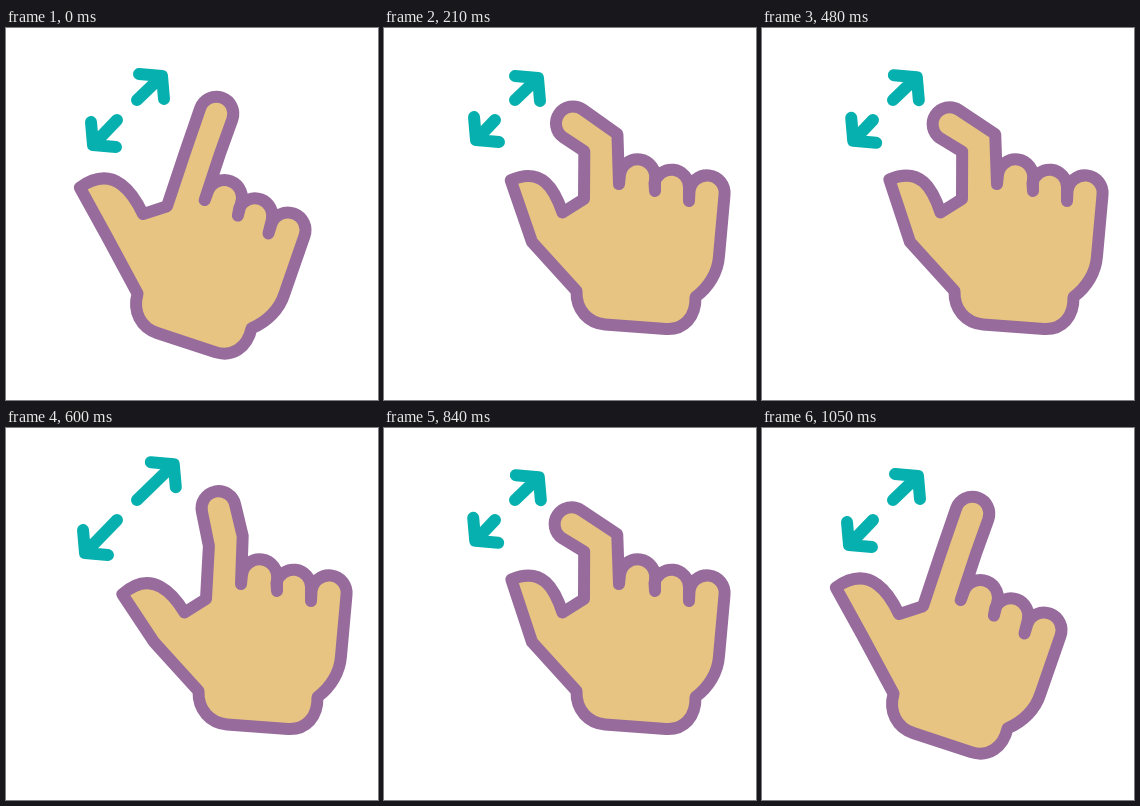
Animation, 372 px wide and 372 px high, one loop 1110 ms. Source, as an HTML page:

```html
<!DOCTYPE html>
<html lang="en">
<head>
<meta charset="utf-8">
<title>Pinch gesture</title>
<style>
  html, body { margin: 0; width: 100%; height: 100%; overflow: hidden; background: #fff; }
  svg { display: block; width: 100%; height: 100%; }
  path { stroke-width: 12; stroke-linecap: round; stroke-linejoin: round; }
  #hand { fill: #e7c481; stroke: #976c9d; }
  .arrow { fill: none; stroke: #06b0ae; }
</style>
</head>
<body>
<svg viewBox="0 0 372 372">
  <path id="upper" class="arrow"/>
  <path id="lower" class="arrow"/>
  <path id="hand"/>
</svg>
<script>
const LOOP = 1110, STEP = 30;
const [hand, upper, lower] = ['hand', 'upper', 'lower'].map(id => document.getElementById(id));

// Piecewise linear track of [time, value] pairs
function track(keys, t) {
  const i = keys.findIndex(key => key[0] > t);
  if (i < 0) return keys[keys.length - 1][1];
  if (i === 0) return keys[0][1];
  const [t0, v0] = keys[i - 1], [t1, v1] = keys[i];
  return v0 + (v1 - v0) * (t - t0) / (t1 - t0);
}

const TURN = [[30, 0], [120, 0.5], [210, 1], [870, 1], [930, 0.64], [1050, 0]];
const BEND = [[30, 0], [120, 0.35], [210, 0.924], [270, 1], [870, 1], [930, 0.68], [1050, 0]];

// Sides of the index finger, with a round tip whose ends face the knuckle
function indexFinger(bend) {
  const radius = 17;
  const right = [238.5 - 5.5 * bend, 109 - 3 * bend];
  const left = [204.3 - 4.3 * bend, 115 + 9 * bend];
  const tip = [225.4 - 39.4 * bend, 69.4 + 27.6 * bend + 8 * bend * (1 - bend)];
  const angle = Math.atan2(tip[1] - (right[1] + left[1]) / 2, tip[0] - (right[0] + left[0]) / 2);
  const nx = -Math.sin(angle) * radius, ny = Math.cos(angle) * radius;
  return `L${right} L${tip[0] + nx},${tip[1] + ny}
    A${radius},${radius} 0 0 0 ${tip[0] - nx},${tip[1] - ny} L${left}`;
}

function thumb(bend) {
  return `L178.5,184.5 C${166 + 5 * bend},${169 - 8 * bend}
    ${139 + 21 * bend},${141 - 3 * bend}
    ${110.8 + 17.2 * bend},${174 - 23.5 * bend} L148,214`;
}

function handPath(bend) {
  return `M192.5,263 C192,282 204,295 221,296.5 L282,301
    C300,302 312,289 311.5,269 C325,259 334,244 335,228 L340.5,167
    A17.5,17.5 0 0 0 305.5,163 L305,173 L305,159
    A17.5,17.5 0 0 0 270.5,155 L271,163 L271,151.5
    A17.5,17.5 0 0 0 236,146.5 L235,156
    ${indexFinger(bend)} L200,171 ${thumb(bend)} Z`;
}

// dir is 1 for up-right, -1 for down-left
function arrowPath(startX, startY, tipX, tipY, dir) {
  return `M${startX},${startY} L${tipX},${tipY}
    M${tipX - 23 * dir},${tipY - 2 * dir} L${tipX},${tipY} l${2 * dir},${23 * dir}`;
}

function draw(now) {
  const t = Math.floor(now % LOOP / STEP) * STEP;
  const turn = track(TURN, t);
  const open = t > 450 && t < 870 ? (1 - Math.cos(2 * Math.PI * (t - 450) / 420)) / 2 : 0;
  const bend = track(BEND, t) - 0.83 * open;

  hand.setAttribute('d', handPath(bend));
  hand.setAttribute('transform',
    `translate(${133 + 61 * turn} ${266 - 3 * turn}) rotate(${14 * (1 - turn)}) translate(-194 -263)`);

  const up = 2 * (1 - turn) + 17 * open;
  const down = 5 * (1 - turn) + 16 * open;
  upper.setAttribute('d', arrowPath(131, 72, 154 + up, 50 - up, 1));
  lower.setAttribute('d', arrowPath(111, 92, 92 - down, 112 + down, -1));
}

let start;
function tick(now) {
  start ??= now;
  draw(now - start);
  requestAnimationFrame(tick);
}
draw(0);
requestAnimationFrame(tick);
</script>
</body>
</html>
```
